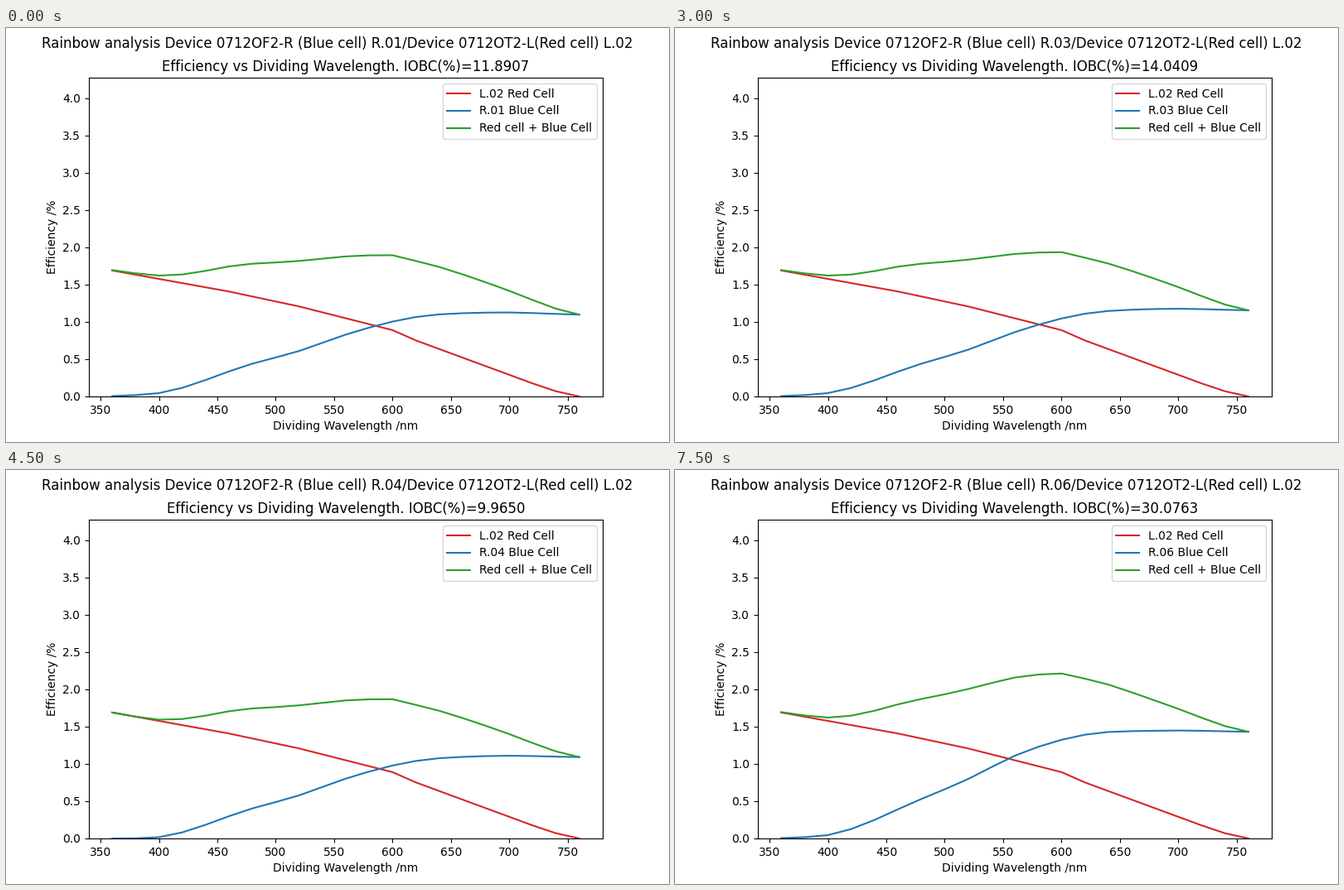
Write a matplotlib script that moves like this. It is 800 by 500 pixels and loops after 8000 ms.

```python
import numpy as np
import matplotlib.pyplot as plt
from matplotlib.animation import FuncAnimation

plt.rcParams["font.family"] = "DejaVu Sans"

STEP_MS = 500
STEPS_PER_SCAN = 3
STEPS = 16

wavelength = np.arange(360, 761, 20)

# The red cell loses efficiency in nearly straight stretches.
red = np.interp(wavelength,
                [360, 460, 520, 600, 620, 720, 740, 760],
                [1.69, 1.408, 1.208, 0.89, 0.752, 0.175, 0.07, 0])

# Each scan: IOBC in percent, then the blue efficiency at the key wavelengths.
BLUE_KEYS = [360, 400, 480, 520, 560, 620, 680, 760]
scans = [
    (11.8907, [0.005, 0.045, 0.44, 0.61, 0.83, 1.066, 1.125, 1.098]),
    (13.7771, [0.005, 0.047, 0.452, 0.63, 0.858, 1.1, 1.175, 1.158]),
    (14.0409, [0.005, 0.045, 0.44, 0.627, 0.863, 1.11, 1.173, 1.156]),
    (9.9650, [0, 0.017, 0.403, 0.578, 0.803, 1.04, 1.105, 1.092]),
    (17.8489, [0, 0.028, 0.43, 0.653, 0.903, 1.18, 1.288, 1.325]),
    (30.0763, [0.005, 0.045, 0.53, 0.797, 1.11, 1.392, 1.445, 1.432]),
]


def smooth(x, keys, values):
    """Cubic Hermite curve through the key points."""
    keys, values = np.array(keys, float), np.array(values)
    slope = np.gradient(values, keys)
    i = np.clip(np.searchsorted(keys, x, side="right") - 1, 0, len(keys) - 2)
    h = keys[i + 1] - keys[i]
    t = (x - keys[i]) / h
    ease = t * t * (3 - 2 * t)
    return (values[i] * (1 - ease) + values[i + 1] * ease
            + h * t * (1 - t) * (slope[i] * (1 - t) - slope[i + 1] * t))


fig, ax = plt.subplots(figsize=(8, 5), dpi=100)


def draw(step):
    index = step // STEPS_PER_SCAN
    iobc, values = scans[index]
    blue = np.maximum(smooth(wavelength, BLUE_KEYS, values), 0)
    name = f"R.{index + 1:02d}"

    ax.clear()
    ax.plot(wavelength, red, color="tab:red", label="L.02 Red Cell")
    ax.plot(wavelength, blue, color="tab:blue", label=f"{name} Blue Cell")
    ax.plot(wavelength, red + blue, color="tab:green", label="Red cell + Blue Cell")
    ax.set_xlim(340, 780)
    ax.set_ylim(0, 4.277)
    ax.set_xlabel("Dividing Wavelength /nm")
    ax.set_ylabel("Efficiency /%")
    ax.set_title(f"Efficiency vs Dividing Wavelength. IOBC(%)={iobc:.4f}")
    ax.legend(loc="upper right")
    fig.suptitle(f"Rainbow analysis Device 0712OF2-R (Blue cell) {name}"
                 "/Device 0712OT2-L(Red cell) L.02")
    return []


anim = FuncAnimation(fig, draw, frames=STEPS, init_func=lambda: draw(0),
                     interval=STEP_MS, repeat=True, repeat_delay=0)
plt.show()
```
